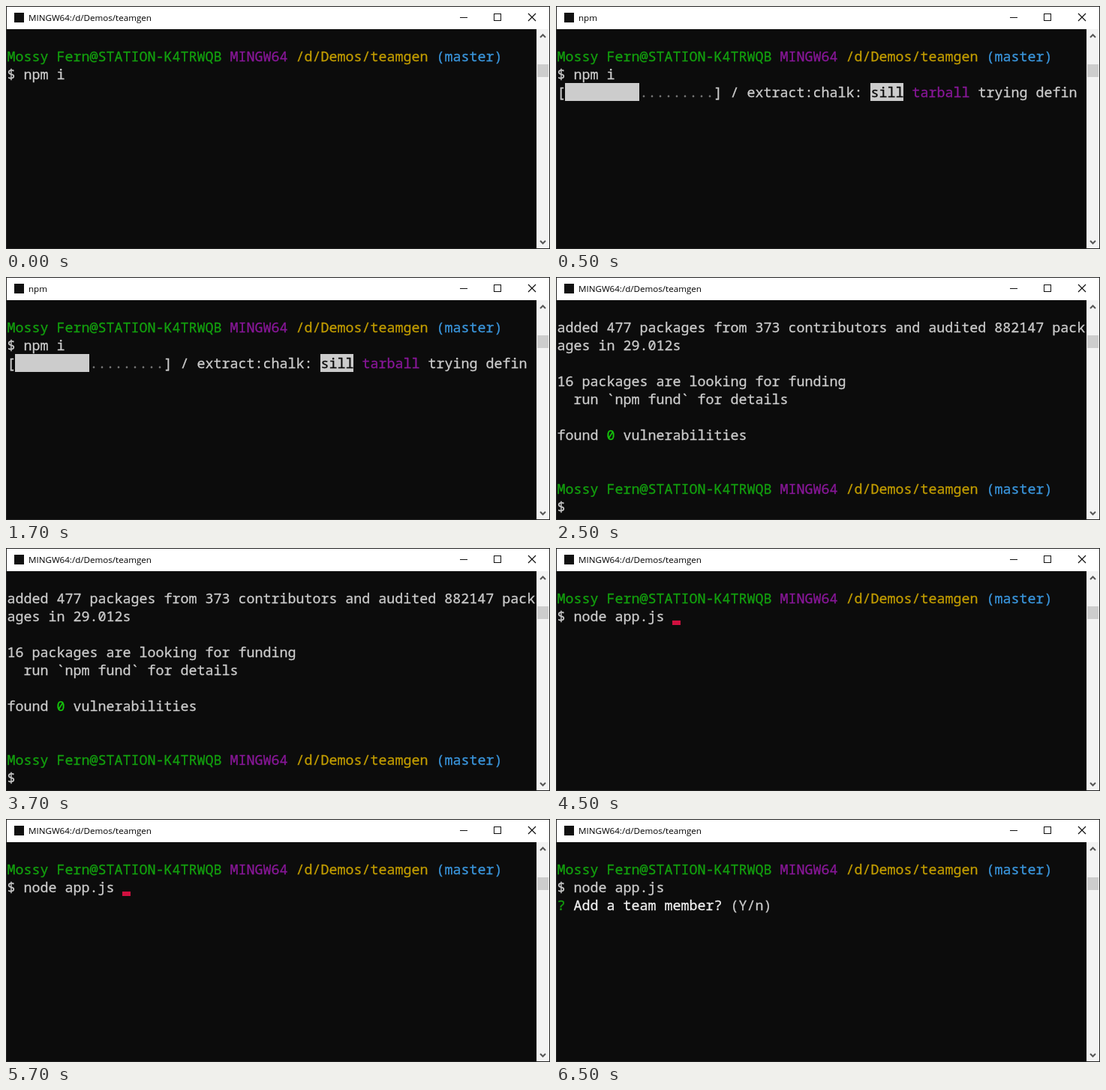
An HTML page for the animation above (8 s loop, 725 px wide and 325 px high).

```html
<!DOCTYPE html>
<html lang="en">
<head>
<meta charset="utf-8">
<title>Terminal session</title>
<style>
  html, body { margin: 0; width: 100%; height: 100%; overflow: hidden; background: #0c0c0c; }
  svg { display: block; width: 725px; height: 325px; }
  text { white-space: pre; }
  .title { font: 11.6px "Open Sans", "Noto Sans", sans-serif; fill: #000; }
  .cell { font: 500 18.333px "Noto Sans Mono", "DejaVu Sans Mono", monospace; stroke-width: .3; }
</style>
</head>
<body>
<svg id="stage" viewBox="0 0 725 325" xmlns="http://www.w3.org/2000/svg">
  <rect width="725" height="325" fill="#0c0c0c"/>
  <rect x="1" y="1" width="723" height="30" fill="#fff"/>
  <rect x="11" y="9" width="13" height="13" fill="#111"/>
  <g fill="none" stroke="#111">
    <path d="M605 15.5h10"/>
    <rect x="650.5" y="10.5" width="9" height="9"/>
    <path d="M696 10l10 10M706 10l-10 10" stroke-width="1.2"/>
  </g>
  <rect x="707" y="31" width="17" height="293" fill="#f3f3f3"/>
  <rect x="708" y="78" width="15" height="17" fill="#cdcdcd"/>
  <g fill="none" stroke="#555" stroke-width="2">
    <path d="M712 42l3.5-3.5l3.5 3.5"/>
    <path d="M712 314l3.5 3.5l3.5-3.5"/>
  </g>
  <rect x=".5" y=".5" width="724" height="324" fill="none" stroke="#222"/>
</svg>
<script>
const NS = "http://www.w3.org/2000/svg";
const LOOP = 8000, COL = 11, ROW = 24, LEFT = 1, TOP = 31;
const C = {
  text: "#cccccc", white: "#f2f2f2", green: "#13a10e", lime: "#16c60c",
  purple: "#881798", gold: "#c19c00", blue: "#3a96dd", grey: "#767676",
  black: "#0c0c0c", red: "#d0103f"
};
const stage = document.getElementById("stage");

function add(parent, tag, attrs, content) {
  const el = document.createElementNS(NS, tag);
  for (const key in attrs) el.setAttribute(key, attrs[key]);
  if (content) el.textContent = content;
  parent.append(el);
  return el;
}

// Each run is [text, colour, background]; runs follow one another along a row.
function line(row, ...runs) {
  return g => {
    let col = 0;
    for (const [str, fill = C.text, back] of runs) {
      const x = LEFT + col * COL, y = TOP + row * ROW;
      if (back) add(g, "rect", { x, y, width: str.length * COL, height: ROW, fill: back });
      if (str.trim()) add(g, "text", { x: x + 0.5, y: y + 19, fill, stroke: fill, class: "cell" }, str);
      col += str.length;
    }
  };
}

const prompt = row => line(row,
  ["Mossy Fern@STATION-K4TRWQB ", C.green], ["MINGW64 ", C.purple],
  ["/d/Demos/teamgen ", C.gold], ["(master)", C.blue]);

const cursor = (row, col) => g => add(g, "rect", {
  x: LEFT + col * COL, y: TOP + (row + 1) * ROW - 6, width: COL, height: 6, fill: C.red
});

const HOME = "MINGW64:/d/Demos/teamgen";
const scenes = [
  { at: 0, title: HOME, parts: [prompt(1), line(2, ["$ npm i"])] },
  { at: 500, title: "npm", parts: [
    prompt(1),
    line(2, ["$ npm i"]),
    line(3, ["["], [" ".repeat(9), C.text, C.text], [".".repeat(9), C.grey],
      ["] / extract:chalk: "], ["sill", C.black, C.text], [" "],
      ["tarball", C.purple], [" trying defin"])
  ] },
  { at: 2500, title: HOME, parts: [
    line(1, ["added 477 packages from 373 contributors and audited 882147 pack"]),
    line(2, ["ages in 29.012s"]),
    line(4, ["16 packages are looking for funding"]),
    line(5, ["  run `npm fund` for details"]),
    line(7, ["found "], ["0", C.lime], [" vulnerabilities"]),
    prompt(10),
    line(11, ["$"])
  ] },
  { at: 4500, title: HOME, parts: [prompt(1), line(2, ["$ node app.js"]), cursor(2, 14)] },
  { at: 6500, title: HOME, parts: [
    prompt(1),
    line(2, ["$ node app.js"]),
    line(3, ["? ", C.green], ["Add a team member? ", C.white], ["(Y/n)"])
  ] }
];

for (const scene of scenes) {
  scene.group = add(stage, "g", { visibility: "hidden" });
  add(scene.group, "text", { x: 30, y: 20, class: "title" }, scene.title);
  scene.parts.forEach(draw => draw(scene.group));
}

const start = performance.now();
function tick(now) {
  const t = Math.max(0, now - start) % LOOP;
  const current = scenes.filter(s => s.at <= t).pop();
  for (const s of scenes) s.group.setAttribute("visibility", s === current ? "visible" : "hidden");
  requestAnimationFrame(tick);
}
tick(start);
</script>
</body>
</html>
```
